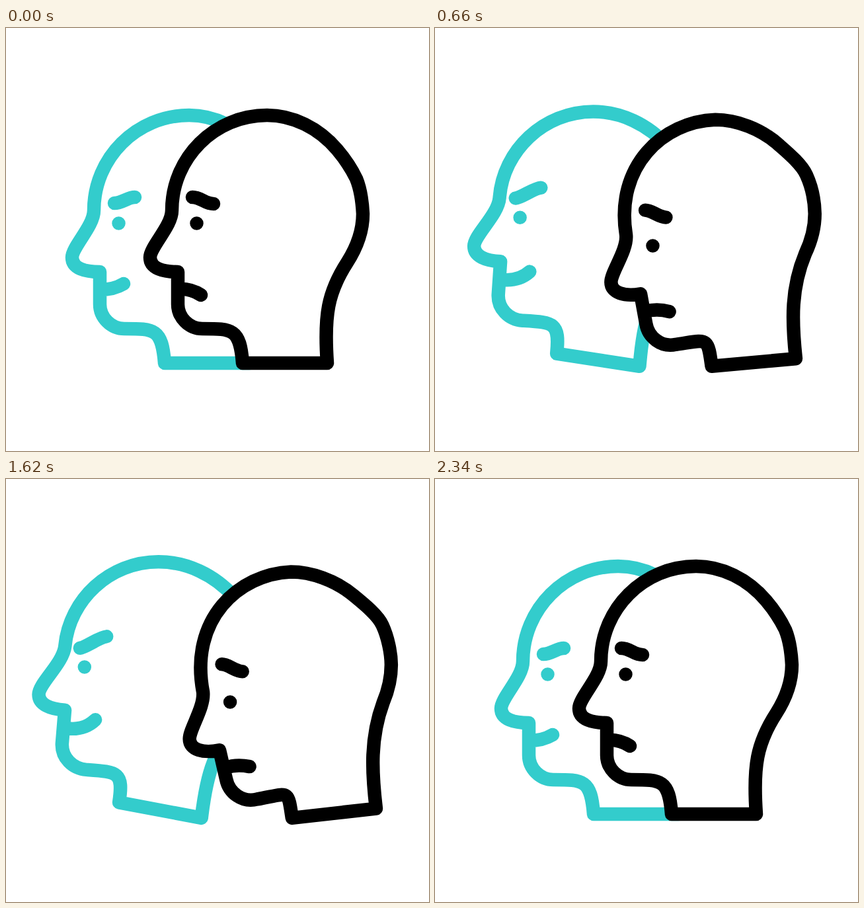
These frames come from a looping animation (640x640 px, 2400 ms). An HTML page:

```html
<!DOCTYPE html>
<html lang="en">
<head>
<meta charset="utf-8">
<style>
  html, body { margin: 0; height: 100%; overflow: hidden; background: #fff; }
  svg { display: block; width: 100%; height: 100%; }
  path { fill: #fff; stroke-width: 20.5; stroke-linecap: round; stroke-linejoin: round; }
</style>
</head>
<body>
<svg viewBox="0 0 640 640">
  <path id="back" stroke="#33cccc" transform="translate(-118)"/>
  <path id="front" stroke="#000"/>
</svg>
<script>
const LOOP = 2400, PEAK = 1170;

// Each pose: head outline, then eye, brow and mouth. All share one command order.
const restHead = `M395 132 C315.5 132 251 196.5 251 276 C251 300 218 331 218 347
  C218 364 238 369 260 369 L260 418 C260 438 277 455 297 455 C343 455 354 455 358 507
  L486 507 C481 434 487 400 516 355 C532 330 540 307 540 281 C539 262 537 245 530 228
  C522 211 512 197 501 184 C473 151 434 132 395 132Z M288.5 295.5 L288.5 295.5`;

const heads = {
  back: {
    from: restHead + 'M282 265 C294 265 302 256 313 256 M260 396 C274 396 286 393 296 387',
    to: `M340 124 C267 124 207 180 199 248 C196 275 158 305 158 322
      C158 337 175 344 197 346 L192 397 C191 418 207 435 229 437 C277 441 285 441 276 486
      L400 514 C411 442 424 410 463 372 C489 345 502 325 502 300 C502 282 500 268 495 250
      C489 222 475 196 457 178 C425 143 383 124 340 124Z M227 282.5 L227 282.5
      M220 254 C228 253 251 236 262 235 M195 373 C215 377 231 374 245 360`
  },
  front: {
    from: restHead + 'M282 256 C295 256 301 266 314 266 M260 395 C273 394 284 397 295 404',
    to: `M438 142 C359 146 282 215 307 331 C310 354 289 387 289 402
      C289 419 311 424 335 418 L347 461 C352 482 373 497 396 490 C445 479.5 440 471 447 514
      L574 497 C567 444 563 390 581 335 C588 316 591 300 591 281 C591 262 585 237 577 220
      C571 206 549 189 531 175 C503 153 466 142 438 142Z M348.7 345.5 L348.7 345.5
      M335 285 C344 285 356 296 366 296 M345 445 C357 440 371 439.5 382.5 441`
  }
};

// Easing: monotone cubic through [ms, amount].
const knots = [[0, 0], [160, .014], [320, .068], [430, .16], [540, .343], [660, .678],
  [720, .842], [800, .925], [980, 1], [PEAK, 1.028]];
const rate = i => (knots[i + 1][1] - knots[i][1]) / (knots[i + 1][0] - knots[i][0]);
const slopes = knots.map((_, i) => {
  if (i === 0 || i === knots.length - 1) return 0;
  const a = rate(i - 1), b = rate(i);
  return 2 * a * b / (a + b);
});

function ease(ms) {
  let i = 0;
  while (i < knots.length - 2 && ms > knots[i + 1][0]) i++;
  const [x0, y0] = knots[i], [x1, y1] = knots[i + 1];
  const h = x1 - x0, s = (ms - x0) / h, r = 1 - s;
  return y0 * r * r * (1 + 2 * s) + y1 * s * s * (3 - 2 * s)
    + h * s * r * (slopes[i] * r - slopes[i + 1] * s);
}

const NUMBER = /[\d.]+/g;
for (const head of Object.values(heads)) head.goal = head.to.match(NUMBER).map(Number);

function morph({ from, goal }, amount) {
  let i = 0;
  return from.replace(NUMBER, n => (+n + (goal[i++] - n) * amount).toFixed(2));
}

function draw(now) {
  const t = Math.min(now % LOOP, 2 * PEAK);
  const amount = ease(PEAK - Math.abs(PEAK - t));
  for (const id in heads) document.getElementById(id).setAttribute('d', morph(heads[id], amount));
  requestAnimationFrame(draw);
}

draw(0);
</script>
</body>
</html>
```
